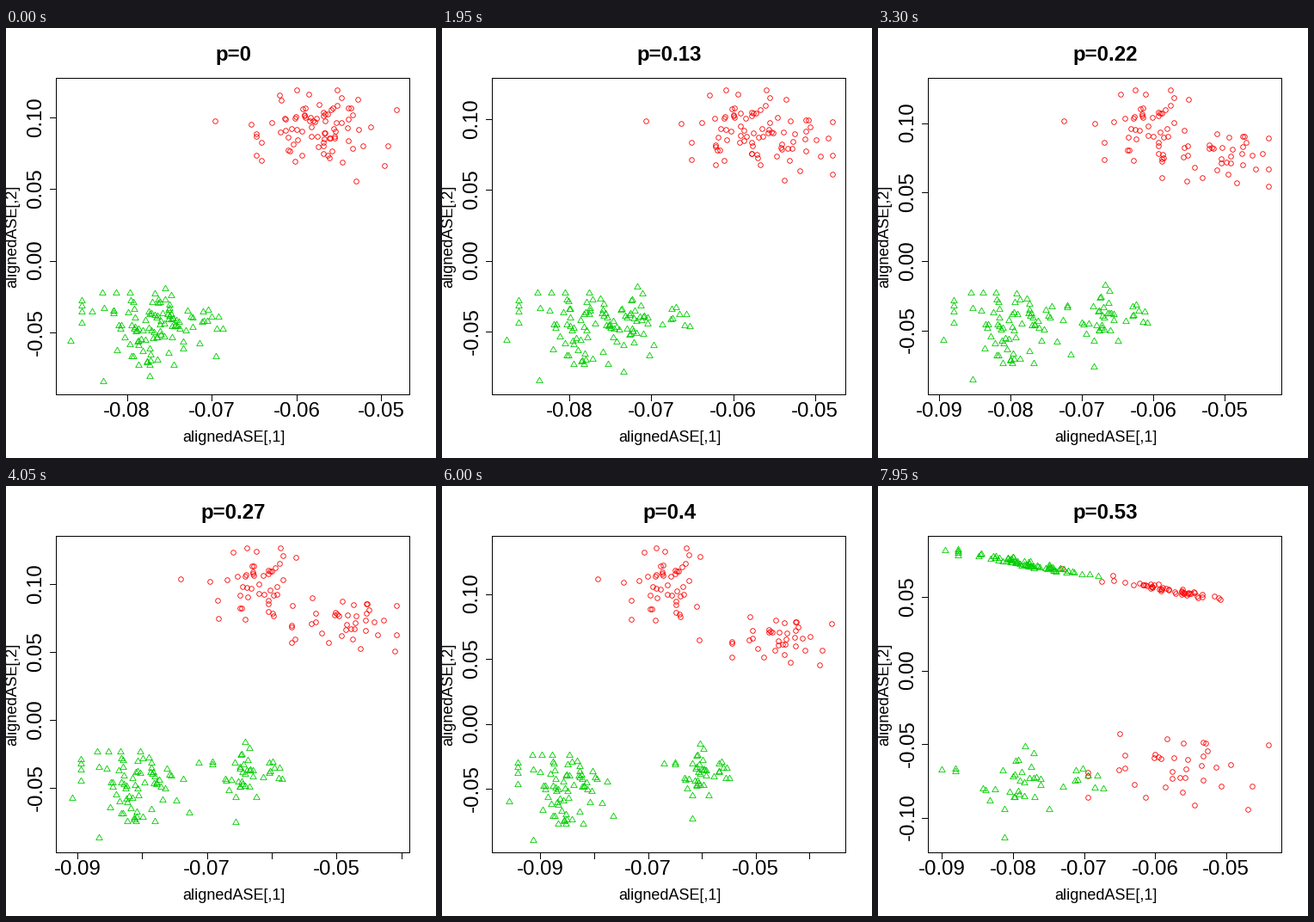
Write a matplotlib script that moves like this. It is 500 by 500 pixels and loops after 8000 ms.

```python
import numpy as np
import matplotlib.pyplot as plt
from matplotlib.animation import FuncAnimation

PX = 0.72  # points per pixel at 100 dpi
LEFT, RIGHT, TOP, BOTTOM = 58.4, 469.4, 58.4, 426
SWITCH = 0.47  # from this p on the second dimension shows the sub-groups
LABEL_GAP = 76
SANS = "Liberation Sans"
TRIANGLE = [(0, 1), (-0.866, -0.5), (0.866, -0.5), (0, 1)]

rng = np.random.default_rng(12)


def ease(p, start, end):
    t = np.clip((p - start) / (end - start), 0, 1)
    return t * t * (3 - 2 * t)


def drift(p):
    return ease(p, 0, 0.4)


def growth(p):
    return p * p / 0.16


def late_scale(p):
    return 1 + 0.5 * (p - 0.53)


def limits(p):
    """Data range as (x min, y min), (x max, y max)."""
    if p >= SWITCH:
        low, high = (-0.0901, -0.1156), (-0.0440, 0.0834)
        return np.array(low) * late_scale(p), np.array(high) * late_scale(p)
    low = -0.0868 * (1 + 0.7 * p * p), -0.0849 - 0.005 * drift(p)
    high = -0.0482 + 0.0125 * ease(p, 0.1, 0.4), 0.1191 + 0.102 * p * p
    return np.array(low), np.array(high)


def make_scale(p):
    """Return the map from data to pixels; the range is padded by 4 percent."""
    low, high = limits(p)
    pad = 0.04 * (high - low)
    corner, size = low - pad, high - low + 2 * pad

    def to_pixel(x, y):
        u, v = (x - corner[0]) / size[0], (y - corner[1]) / size[1]
        return LEFT + u * (RIGHT - LEFT), BOTTOM - v * (BOTTOM - TOP)

    return to_pixel


class Cloud:
    """Normal cloud moving between (centre x, centre y, spread x, spread y) states."""

    def __init__(self, count, pace, start, end, late, outliers, on_line=False):
        bulk = np.clip(0.92 * rng.normal(size=(count, 2)), -1.9, 1.9)
        self.unit = np.vstack([outliers, bulk])
        self.pace = pace
        self.start, self.end, self.late = map(np.array, (start, end, late))
        self.on_line = on_line
        self.noise = rng.normal(0, 0.0012, len(self.unit))

    def points(self, p):
        if p >= SWITCH:
            state = self.late * late_scale(p)
        else:
            state = self.start + (self.end - self.start) * self.pace(p)
        x, y = (state[:2] + state[2:] * self.unit).T
        if self.on_line and p >= SWITCH:
            y = 0.0826 - 0.87 * (x + 0.0898) + self.noise
        low, high = limits(p)
        return np.clip(x, low[0], high[0]), np.clip(y, low[1], high[1])


red_clouds = [
    Cloud(45, growth, (-0.0589, 0.0936, 0.0037, 0.0135),
          (-0.0672, 0.1072, 0.0042, 0.0153), (-0.0589, 0, 0.0049, 0),
          [(-2.9, 0.3), (-0.3, 1.9), (1.65, 1.4), (1.6, -2.8)], on_line=True),
    Cloud(34, drift, (-0.0570, 0.0936, 0.0041, 0.0130),
          (-0.0460, 0.0677, 0.0044, 0.0106), (-0.0579, -0.0635, 0.0061, 0.0146),
          [(2.3, 0.9), (1.8, -2.1), (-1.9, -0.4)]),
]
green_clouds = [
    Cloud(69, growth, (-0.0779, -0.0474, 0.0039, 0.0132),
          (-0.0859, -0.0505, 0.0044, 0.0140), (-0.0785, 0, 0.0049, 0),
          [(-2.25, -0.65), (-1.25, -2.8), (2.15, -1.45), (-0.45, 1.9)], on_line=True),
    Cloud(38, drift, (-0.0755, -0.0460, 0.0036, 0.0132),
          (-0.0603, -0.0405, 0.0028, 0.0126), (-0.0783, -0.0785, 0.0058, 0.0135),
          [(-2.4, 0.8), (0, 2), (-0.5, -2.6), (1.7, -0.1)]),
]

fig = plt.figure(figsize=(5, 5), dpi=100, facecolor="white")
ax = fig.add_axes([0, 0, 1, 1])
ax.set(xlim=(0, 500), ylim=(500, 0))
ax.axis("off")


def write(x, y, text, size, **style):
    return ax.text(x, y, text, fontsize=size * PX, family=SANS, ha="center",
                   va="baseline", rotation_mode="anchor", **style)


def line(xs, ys):
    return ax.plot(xs, ys, color="black", lw=PX)[0]


def scatter(marker, size, color):
    return ax.plot([], [], ls="none", marker=marker, ms=size * PX, mfc="none",
                   mec=color, mew=0.85 * PX)[0]


line([LEFT, RIGHT, RIGHT, LEFT, LEFT], [TOP, TOP, BOTTOM, BOTTOM, TOP])
write(264.5, 481, "alignedASE[,1]", 18)
write(12.5, 242.5, "alignedASE[,2]", 18, rotation=90)
title = write(264.5, 38, "", 24, weight="bold")
red_dots = scatter("o", 5.6, "#ff0000")
green_dots = scatter(TRIANGLE, 8.6, "#00cd00")
axis_parts = []


def draw_axes(to_pixel):
    while axis_parts:
        axis_parts.pop().remove()
    last = -LABEL_GAP
    for n in range(-10, -2):
        x, _ = to_pixel(n / 100, 0)
        if LEFT <= x <= RIGHT:
            axis_parts.append(line([x, x], [BOTTOM, BOTTOM + 7]))
            if x - last >= LABEL_GAP:
                axis_parts.append(write(x, 452, f"{n / 100:.2f}", 24))
                last = x
    for n in range(-3, 4):
        _, y = to_pixel(0, n / 20)
        if TOP <= y <= BOTTOM:
            axis_parts.append(line([LEFT - 7, LEFT], [y, y]))
            axis_parts.append(write(41.5, y - 0.7, f"{n / 20:.2f}", 24, rotation=90))


def draw(frame):
    p = (frame // 3) / 100
    to_pixel = make_scale(p)
    title.set_text(f"p={p:g}")
    draw_axes(to_pixel)
    for dots, clouds in ((red_dots, red_clouds), (green_dots, green_clouds)):
        x, y = np.hstack([cloud.points(p) for cloud in clouds])
        dots.set_data(*to_pixel(x, y))
    return []


animation = FuncAnimation(fig, draw, frames=160, interval=50, repeat=True,
                          repeat_delay=0, init_func=lambda: draw(0))
plt.show()
```
